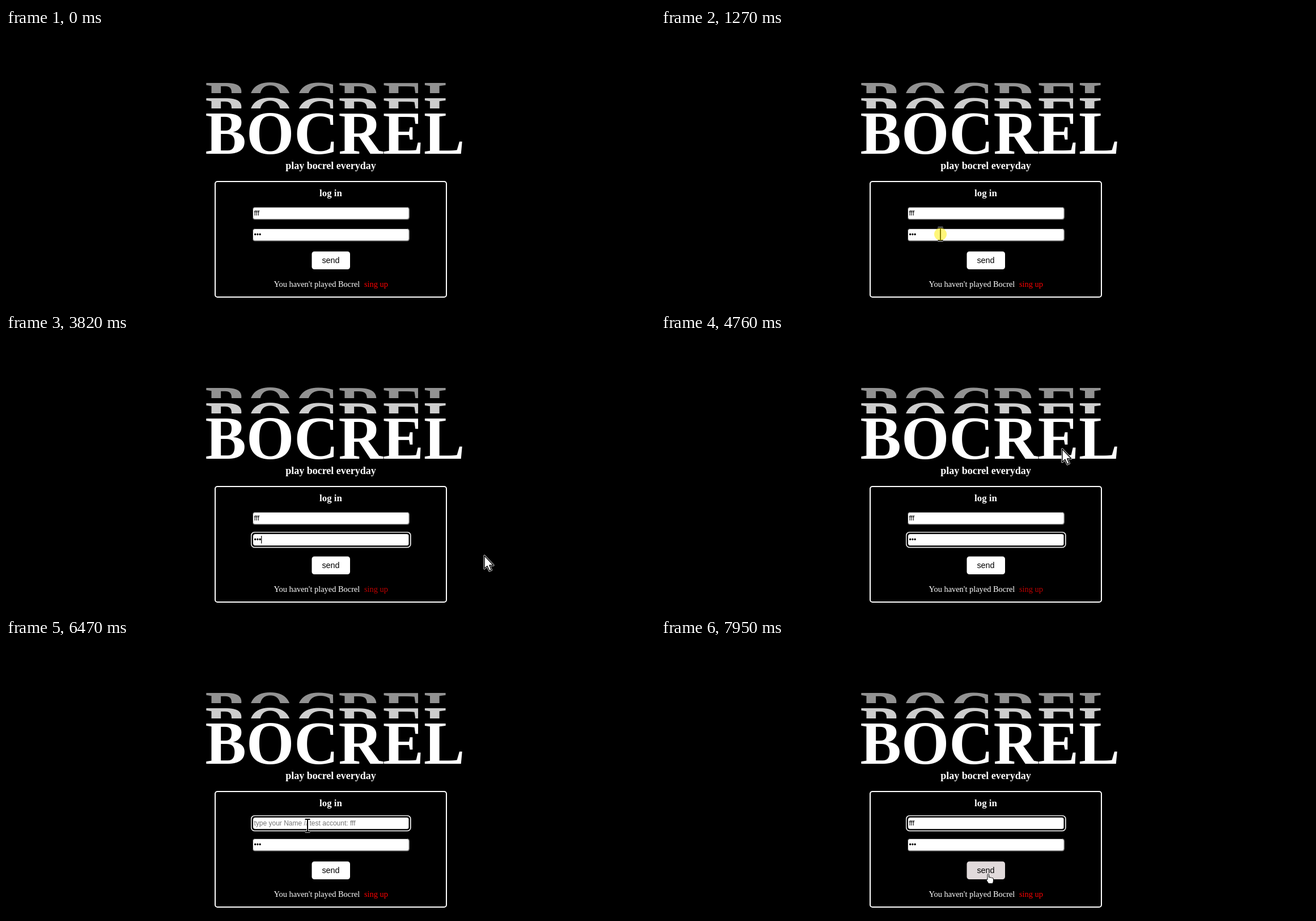
Animation, 1145 px wide and 489 px high, one loop 8 s. Source, as an HTML page:

```html
<!DOCTYPE html>
<html lang="en">
<head>
<meta charset="utf-8">
<title>Log in</title>
<style>
  html, body { margin: 0; width: 100%; height: 100%; overflow: hidden; background: #000; }
  svg { display: block; width: 100vw; height: 100vh; }
  text { white-space: pre; font-variant-ligatures: none; }
  .serif { font-family: "Liberation Serif", "Times New Roman", serif; fill: #fff; }
  .sans { font-family: "Liberation Sans", Arial, sans-serif; fill: #000; }
  .title { font-size: 108.4px; font-weight: bold; }
  .bold { font-weight: bold; text-anchor: middle; }
  .note { font-size: 14.4px; }
  .input { font-size: 12px; }
  .hint { fill: #757575; }
</style>
</head>
<body>
<svg viewBox="0 0 1145 489">
  <clipPath id="upper"><rect width="1145" height="115"/></clipPath>
  <clipPath id="middle"><rect width="1145" height="142"/></clipPath>
  <g class="serif title">
    <g clip-path="url(#upper)"><text x="351.6" y="167.5" fill="#929292">BOCREL</text></g>
    <g clip-path="url(#middle)"><text x="351.6" y="194.5" fill="#cdcdcd">BOCREL</text></g>
    <text x="351.6" y="221.5">BOCREL</text>
  </g>
  <text class="serif bold" x="573" y="248.5" font-size="18">play bocrel everyday</text>
  <rect x="369" y="271" width="408" height="204" rx="4" fill="none" stroke="#fff" stroke-width="2"/>
  <text class="serif bold" x="573" y="297" font-size="16.85">log in</text>
  <g id="fields"></g>
  <rect id="button" x="539.5" y="394.5" width="67.5" height="31.5" rx="4.5"/>
  <text class="sans" x="573" y="415" font-size="14.4" text-anchor="middle">send</text>
  <text class="serif note" x="472.5" y="456.5">You haven't played Bocrel</text>
  <text id="link" class="serif note" x="632" y="456.5">sing up</text>
  <g id="cursor">
    <g id="arrow" fill="#fff" stroke-linejoin="round">
      <path d="M0 0V23L5 18.5L9 27L12.5 25.3L9 17H16Z" stroke="#fff" stroke-width="3"/>
      <path d="M0 0V23L5 18.5L9 27L12.5 25.3L9 17H16Z" stroke="#000" stroke-width="1.5"/>
    </g>
    <g id="beam" fill="none">
      <path d="M-4.5-11H4.5M0-11V11M-4.5 11H4.5" stroke="#fff" stroke-width="3.5"/>
      <path d="M-4.5-11H4.5M0-11V11M-4.5 11H4.5" stroke="#000" stroke-width="2"/>
    </g>
    <path id="hand" d="M-1 1.5Q.3-1 1.6 1.5V6.5Q3 5.5 4 7Q5.5 6 6.5 7.6Q9 7 9.5 9V13Q9 15 8 17.5H1Q-1.5 14-3 11Q-3 9-1 10.5Z"
      fill="#fff" stroke="#000"/>
    <circle id="click" r="11" fill="#fe0" fill-opacity=".52"/>
  </g>
</svg>
<script>
const LOOP = 8000, FRAME = 70;
const byId = id => document.getElementById(id);
const within = (t, spans) => spans.some(([from, to]) => t >= from && t < to);
const show = (el, on) => el.setAttribute('visibility', on ? 'visible' : 'hidden');

// edits: [time, number of characters from then on]
const fields = [
  { y: 316, char: 'f', advance: 3.33, hint: 'type your Name // test account: fff',
    focused: [[5240, LOOP]], selected: [[5380, 5780]],
    caretOn: [[5240, 5380], [5780, 6320], [6730, 7590]],
    edits: [[0, 3], [6120, 2], [6320, 1], [6470, 0], [6730, 1], [6930, 2], [7060, 3]] },
  { y: 354, char: '•', advance: 4.2, hint: 'type your Password // test password: fff',
    focused: [[1340, 5240]], selected: [],
    caretOn: [[1340, 1880], [2410, 2890], [2960, 4350], [4880, 5240]],
    edits: [[0, 3], [2960, 2], [3090, 1], [3220, 0], [3420, 1], [3690, 2], [3820, 3]] }
];
const clicks = [[1270, 1340], [5170, 5310]];
const dimLink = [[1340, 5170]];

// Each move starts where the previous one ended and bends towards "via".
const moves = [
  { at: 120, steps: 8, via: [600, 295], to: [463, 358] },
  { at: 860, steps: 3, to: [493, 364] },
  { at: 1340, steps: 4, via: [680, 400], to: [844, 393] },
  { at: 4350, steps: 1, to: [845, 393] },
  { at: 4550, steps: 9, via: [690, 36], to: [538, 333] },
  { at: 5310, steps: 1, to: [536, 333] },
  { at: 5380, steps: 1, to: [532, 331] },
  { at: 7260, steps: 8, via: [540, 320], to: [577, 425] },
  { at: 7950, steps: 1, to: [577, 416] }
];

function cursorAt(t) {
  let pos = [1090, 505];
  for (const { at, steps, via, to } of moves) {
    if (t < at) break;
    const p = Math.min(1, (Math.floor((t - at) / FRAME) + 1) / steps), q = 1 - p;
    pos = pos.map((from, i) => {
      const bend = via ? via[i] : (from + to[i]) / 2;
      return q * q * from + 2 * p * q * bend + p * p * to[i];
    });
  }
  return pos;
}

for (const field of fields) {
  const g = document.createElementNS('http://www.w3.org/2000/svg', 'g');
  g.setAttribute('transform', `translate(435 ${field.y})`);
  g.innerHTML = `
    <rect width="277" height="22.5" rx="4.5" fill="#767676"/>
    <path d="M.5 19V5Q.5 .5 5 .5H273" fill="none" stroke="#333"/>
    <rect x="1" y="1" width="274.5" height="20" rx="3.5" fill="#fff"/>
    <g fill="none">
      <rect x="-2.2" y="-2.2" width="281" height="26.6" rx="5.5" stroke="#fff" stroke-width="1.6"/>
      <rect x="-.2" y="-.2" width="277" height="22.6" rx="4.5" stroke="#101010" stroke-width="2.4"/>
    </g>
    <rect x="2.5" y="4" width="10.5" height="13.5" fill="#0078d7"/>
    <text class="sans input" x="2.5" y="15"></text>
    <rect y="4" width="1.2" height="13.5"/>`;
  const [, , , ring, selection, text, caret] = g.children;
  Object.assign(field, { ring, selection, text, caret });
  byId('fields').append(g);
}

function drawField(field, t) {
  const count = field.edits.filter(([time]) => t >= time).pop()[1];
  const selected = within(t, field.selected);
  field.text.textContent = count ? field.char.repeat(count) : field.hint;
  field.text.classList.toggle('hint', !count);
  field.text.style.fill = selected ? '#fff' : '';
  field.caret.setAttribute('x', 2.5 + count * field.advance);
  show(field.ring, within(t, field.focused));
  show(field.selection, selected);
  show(field.caret, within(t, field.caretOn));
}

function draw() {
  const t = performance.now() % LOOP;
  fields.forEach(field => drawField(field, t));

  const [x, y] = cursorAt(t);
  const overField = x > 435 && x < 712 && fields.some(f => y > f.y && y < f.y + 22.5);
  const overButton = x > 539 && x < 607 && y > 394 && y < 426;
  byId('cursor').setAttribute('transform', `translate(${x} ${y})`);
  show(byId('beam'), overField);
  show(byId('hand'), overButton);
  show(byId('arrow'), !overField && !overButton);
  show(byId('click'), within(t, clicks));
  byId('button').style.fill = overButton ? '#e1dadb' : '#fff';
  byId('link').style.fill = within(t, dimLink) ? '#c00000' : '#f00';
  requestAnimationFrame(draw);
}
draw();
</script>
</body>
</html>
```
